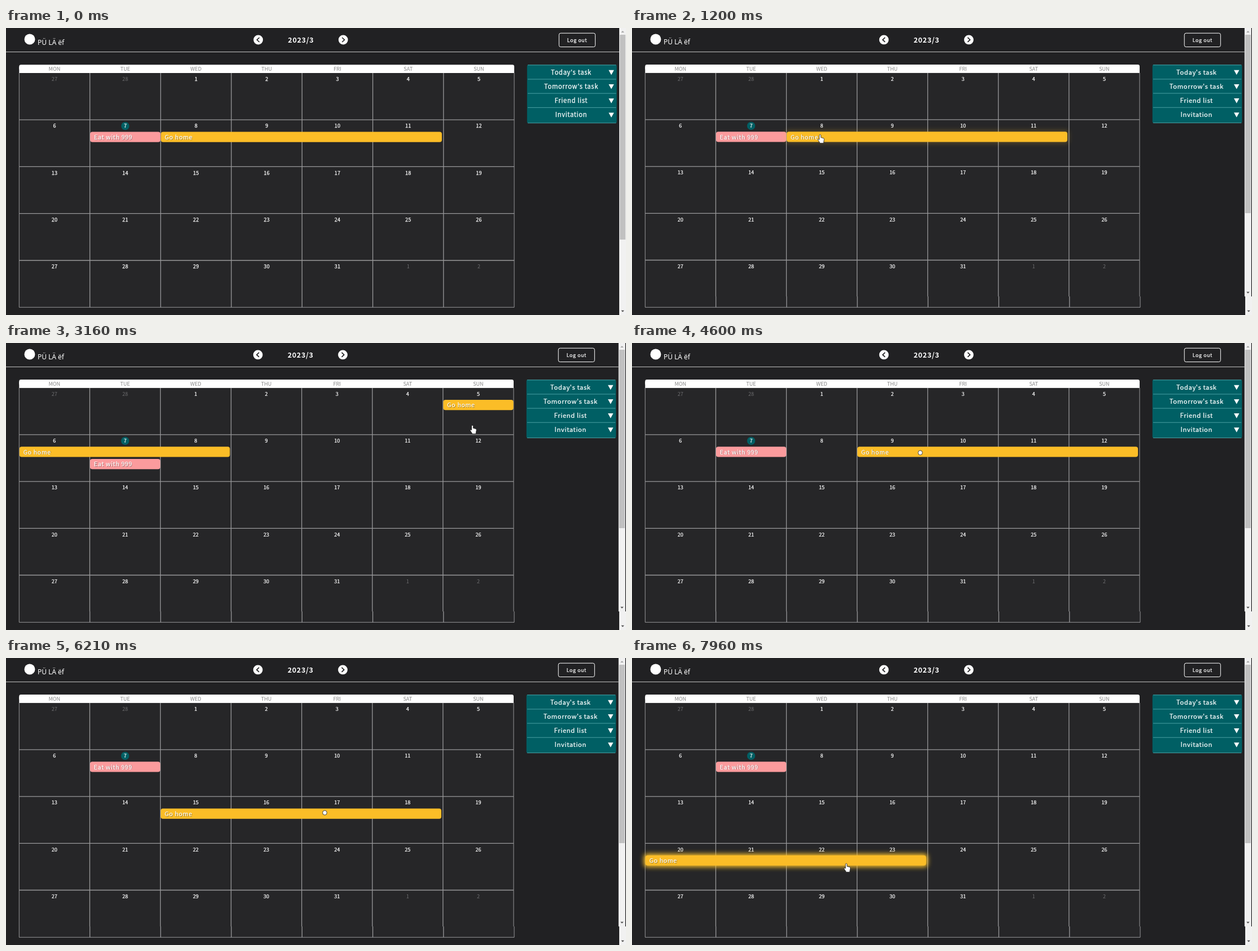
Write an HTML page that moves like this. It is 1098 px wide and 510 px high and loops after 8 s.

```html
<!DOCTYPE html>
<html lang="en">
<head>
<meta charset="utf-8">
<title>Calendar drag and drop</title>
<style>
  html, body { margin: 0; width: 100%; height: 100%; overflow: hidden; background: #212123; }
  svg { display: block; width: 1098px; height: 510px; }
  text {
    font-family: "Noto Sans CJK TC", "Noto Sans CJK JP", "Noto Sans", sans-serif;
    font-weight: 500; fill: #fff; stroke: #fff; stroke-width: .25px;
  }
  .mid { text-anchor: middle; }
  .wide { letter-spacing: .65px; }
  .bold { font-weight: 700; stroke: none; }
  .logo { font-family: "Noto Sans", sans-serif; font-weight: 300; stroke: none; }
  .day { fill: #858585; font-weight: 400; stroke: none; }
  .faded { fill: #6d6d6f; stroke: none; }
  .shade { fill: #000; stroke: none; opacity: .4; }
</style>
</head>
<body>
<svg id="stage" viewBox="0 0 1098 510" xmlns="http://www.w3.org/2000/svg"></svg>
<script>
const LOOP = 8000, RESIZE = 100;
const BG = '#212123', TEAL = '#005f64', YELLOW = '#fbbd27', PINK = '#fb9b9d';
const LEFT = 23.3, TOP = 79.8, COL = 125.25, ROW = 83.3;
const RIGHT = LEFT + 7 * COL, BOTTOM = TOP + 5 * ROW;
const stage = document.getElementById('stage');

const rect = (x, y, w, h, fill, extra = '') =>
  `<rect x="${x}" y="${y}" width="${w}" height="${h}" fill="${fill}" ${extra}/>`;
const line = (x1, y1, x2, y2, color, w = 1) =>
  `<path d="M${x1} ${y1}L${x2} ${y2}" stroke="${color}" stroke-width="${w}"/>`;
const label = (s, x, y, size, cls = '') =>
  `<text x="${x}" y="${y}" font-size="${size}" class="${cls}">${s}</text>`;
const cellX = i => LEFT + i % 7 * COL;
const cellY = i => TOP + Math.floor(i / 7) * ROW;

function header() {
  const arrow = (x, dir) =>
    `<circle cx="${x}" cy="21" r="8.4" fill="#fff"/>
     <path d="M${x - 2 * dir} 17l${4.2 * dir} 4l${-4.2 * dir} 4" fill="none" stroke="${BG}" stroke-width="1.7"/>`;
  return '<circle cx="42" cy="20" r="9.5" fill="#fff"/>' +
    label('PÜ LÄ ëf', 56, 29.5, 12, 'logo') +
    arrow(446.7, -1) + arrow(597.2, 1) +
    label('2023/3', 522.3, 26.4, 12.6, 'mid wide bold') +
    rect(979.4, 9.2, 64.2, 24.4, 'none', 'rx="3" stroke="#fff"') +
    label('Log out', 1011.6, 24.6, 8.8, 'mid wide') +
    line(0, 42.5, 1086, 42.5, '#c4c4c4');
}

function calendar() {
  const grid = '#98989a';
  let out = rect(LEFT, TOP, 7 * COL, 5 * ROW, '#262628');
  for (let x = 0; x <= 7; x++) out += line(LEFT + x * COL, TOP, LEFT + x * COL, BOTTOM, grid, x % 7 ? 1.3 : 1);
  for (let y = 1; y <= 5; y++) out += line(LEFT, TOP + y * ROW, RIGHT, TOP + y * ROW, grid, y < 5 ? 1.3 : 1);
  out += rect(LEFT, 65.2, 7 * COL, 10, '#fff', 'rx="3.2"') + rect(LEFT, 69, 7 * COL, 11, '#fff');
  ['MON', 'TUE', 'WED', 'THU', 'FRI', 'SAT', 'SUN'].forEach((d, i) => {
    out += label(d, cellX(i) + COL / 2, 75.7, 9.1, 'mid day');
  });
  for (let i = 0; i < 35; i++) {
    const x = cellX(i) + COL / 2, y = cellY(i);
    const date = i < 2 ? 27 + i : (i - 2) % 31 + 1;
    if (date === 7) out += `<circle cx="${x}" cy="${y + 11}" r="7.2" fill="${TEAL}"/>`;
    out += label(date, x, y + 14.3, 9.1, i > 1 && i < 33 ? 'mid' : 'mid faded');
  }
  return out;
}

function sidebar() {
  let out = rect(922.8, 65.4, 158.8, 103.6, TEAL, 'rx="2.5"');
  ["Today's task", "Tomorrow's task", 'Friend list', 'Invitation'].forEach((s, i) => {
    const y = 65.8 + i * 25.2;
    out += line(924, y, 1080.5, y, '#4ba0a4') +
      label(s, 1001, y + 17, 11.2, 'mid wide') +
      `<path d="M1067.3 ${y + 9}h9.4l-4.7 8.6z" fill="#fff"/>`;
  });
  return out + line(924, 168.8, 1080.5, 168.8, '#4ba0a4');
}

function scrollbar(x, h, thumbEnd) {
  return rect(x, 0, 12, h, '#f1f1f1') + rect(x + 1, 12, 10, thumbEnd - 12, '#c1c1c1') +
    `<path d="M${x + 3.4} 8h5.4l-2.7 -3z" fill="#a3a3a3"/>` +
    `<path d="M${x + 3.4} ${h - 8.3}h5.4l-2.7 3z" fill="#505050"/>`;
}

// The resized view covers only the upper part of the stage.
stage.innerHTML = `
  <defs>
    <filter id="blur" filterUnits="userSpaceOnUse" x="0" y="0" width="1098" height="510"><feGaussianBlur stdDeviation="4.2"/></filter>
    <clipPath id="view"><rect width="1098" height="477"/></clipPath>
  </defs>
  ${rect(0, 0, 1098, 510, BG)}
  <g id="page">${header()}${calendar()}${sidebar()}<g id="tasks"></g></g>
  ${scrollbar(1086, 510, 376)}
  <g id="resized" clip-path="url(#view)">
    ${rect(0, 0, 1098, 477, BG)}
    <use href="#page" transform="scale(.9988)"/>
    ${scrollbar(1084.8, 477, 329)}
  </g>
  <g id="cursor" stroke="#1c1c1c" stroke-width=".8" stroke-linejoin="round" fill="#fff">
    <path id="hand" d="M-1.4 1Q0 -.7 1.4 1V5.3L5.8 6.4Q7.4 6.9 7.2 8.8L6 15.4H0L-3.9 9.4Q-4.1 7.5 -2.4 8.2L-1.4 9Z"/>
    <ellipse id="fist" cx="4.5" cy="4" rx="3.8" ry="4"/>
  </g>`;

const [tasks, resized, cursor, hand, fist] =
  ['tasks', 'resized', 'cursor', 'hand', 'fist'].map(id => document.getElementById(id));

// Each stop: the task lands in a cell, the cursor moves on, hovers and grabs it again.
const stops = [
  { drop: 0, cell: 9, from: [646, 282], to: [322, 186], move: 570, arrive: 1280, hover: 1180, grab: 1860 },
  { drop: 2750, cell: 6, from: [826, 146], to: [822, 116], move: 3160, arrive: 3460, hover: 3350, grab: 3880 },
  { drop: 4600, cell: 10, from: [506, 191], to: [742, 195], move: 4850, arrive: 5310, hover: 4830, grab: 5650 },
  { drop: 6210, cell: 16, from: [560, 271], to: [566, 273], move: 6290, arrive: 6600, hover: 6850, grab: 7400 },
  { drop: 7810, cell: 21, from: [379.5, 365], to: [379.5, 365], move: 7810, arrive: LOOP, hover: 7850, grab: LOOP }
];
const RELEASE = 80, FADE = 100;

const ramp = (t, a, b) => Math.min(1, Math.max(0, (t - a) / (b - a)));
const ease = p => p * p * (3 - 2 * p);

function bar(title, cell, days, slot, color, glow = 0) {
  const x = cellX(cell) + .5, y = cellY(cell) + 21.4 + slot * 21.8, w = days * 124.4;
  const halo = glow ? rect(x - 2.5, y - 2.5, w + 5, 23.2, '#ffc52a', `rx="5" filter="url(#blur)" opacity="${glow}"`) : '';
  return halo + rect(x, y, w, 18.2, color, 'rx="4"') +
    label(title, x + 7.8, y + 14.2, 10.6, 'wide shade') +
    label(title, x + 7, y + 13.4, 10.6, 'wide');
}

// A task that reaches past Sunday continues on the next row and pushes the other one down.
function drawTasks(cell, glow) {
  const first = Math.min(4, 7 - cell % 7), rest = 4 - first;
  return bar('Eat with 999', 8, 1, rest ? 1 : 0, PINK) +
    bar('Go home', cell, first, 0, YELLOW, glow) +
    (rest ? bar('Go home', cell + first, rest, 0, YELLOW) : '');
}

let shown = '';
function draw(t) {
  const stop = stops.filter(s => s.drop <= t).pop();
  const markup = drawTasks(stop.cell, ramp(t, stop.hover, stop.hover + FADE));
  if (markup !== shown) tasks.innerHTML = shown = markup;

  const p = ease(ramp(t, stop.move, stop.arrive));
  const [x, y] = stop.from.map((v, i) => v + (stop.to[i] - v) * p);
  const grabbing = t >= stop.grab || (stop.drop > 0 && t < stop.drop + RELEASE);
  cursor.setAttribute('transform', `translate(${x} ${y})`);
  hand.style.display = grabbing ? 'none' : '';
  fist.style.display = grabbing ? '' : 'none';
  resized.style.display = cursor.style.display = t < RESIZE ? 'none' : '';
}

const begin = performance.now();
function tick() {
  draw((performance.now() - begin) % LOOP);
  requestAnimationFrame(tick);
}
tick();
</script>
</body>
</html>
```
